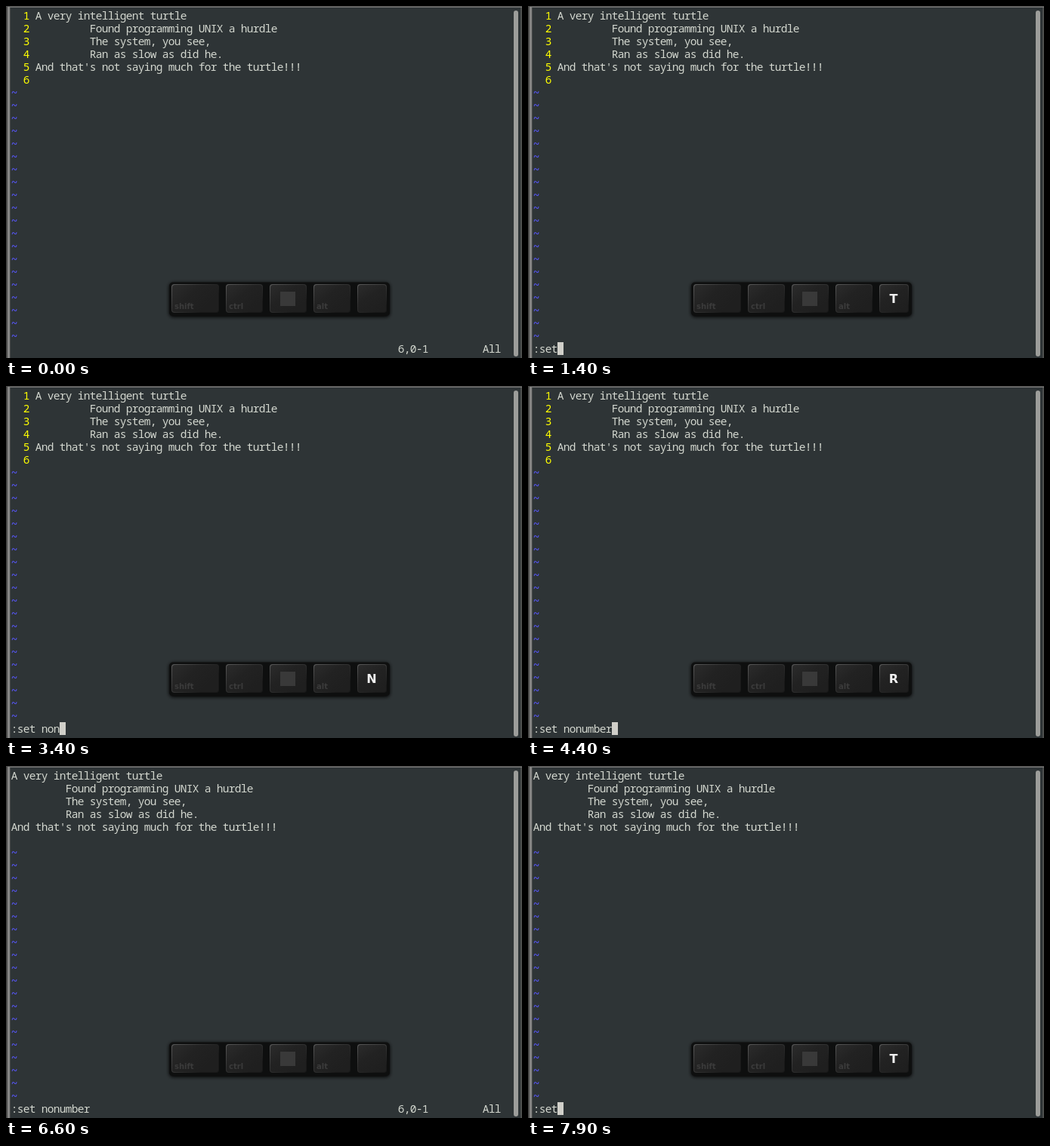
An HTML page with a canvas for the animation above (8000 ms loop, 683x467 px).

```html
<!DOCTYPE html>
<html lang="en">
<head>
<meta charset="utf-8">
<title>Terminal editor</title>
<style>
html, body { margin: 0; width: 100%; height: 100%; overflow: hidden; background: #2e3436; }
canvas { display: block; }
</style>
</head>
<body>
<canvas id="stage" width="683" height="467"></canvas>
<script>
const ctx = document.getElementById('stage').getContext('2d');
const LOOP = 8000, COL = 8, ROW = 17, LEFT = 7, TOP = 4, LAST = 26;
const MONO = '14.5px "Noto Sans Mono", "DejaVu Sans Mono", monospace';
const FG = '#d3d7cf', CURSOR = '#d0cfc9';
const INDENT = ' '.repeat(9);
const POEM = [
  'A very intelligent turtle',
  INDENT + 'Found programming UNIX a hurdle',
  INDENT + 'The system, you see,',
  INDENT + 'Ran as slow as did he.',
  "And that's not saying much for the turtle!!!",
  ''
];

// [start ms, command line (null = normal mode), key on display]
const STEPS = [
  [0, null, ''],
  [500, ':', ':'], [1000, ':', ''], [1100, ':s', 'S'], [1200, ':se', 'E'], [1400, ':set', 'T'],
  [1800, ':set ', 'Space'], [2100, ':set n', 'N'], [2200, ':set no', 'O'],
  [2800, ':set nom', 'M'], [3100, ':set no', 'Back'], [3400, ':set non', 'N'],
  [3600, ':set nonu', 'U'], [3800, ':set nonum', 'M'],
  [4000, ':set nonum', 'B'], [4100, ':set nonumb', 'B'],
  [4300, ':set nonumbe', 'E'], [4400, ':set nonumber', 'R'],
  [4800, null, 'Enter'], [5300, null, ''],
  [7000, null, ':'], [7100, ':', ':'], [7500, ':', ''],
  [7600, ':s', 'S'], [7700, ':se', 'E'], [7900, ':set', 'T']
];
const CURSOR_ON = [[300, 500], [4800, 5400], [6000, 6600], [6900, 7100]];
const SHIFT_ON = [[300, 1000], [6900, 7500]];

const within = (spans, t) => spans.some(([a, b]) => t >= a && t < b);

function rect(x, y, w, h, color) {
  ctx.fillStyle = color;
  ctx.fillRect(x, y, w, h);
}

function box(x, y, w, h, r, color) {
  ctx.fillStyle = color;
  ctx.beginPath();
  ctx.roundRect(x, y, w, h, r);
  ctx.fill();
}

// terminal text: each character is centred in its cell
function print(str, col, row, color = FG, weight = '') {
  ctx.font = `${weight} ${MONO}`;
  ctx.textAlign = 'center';
  ctx.fillStyle = color;
  [...str].forEach((c, i) => {
    ctx.fillText(c, LEFT + (col + i + 0.5) * COL, TOP + row * ROW + 14);
  });
}

function drawCursor(col, row) {
  rect(LEFT + col * COL, TOP + row * ROW, COL, ROW, CURSOR);
}

function drawWindow() {
  rect(0, 0, 683, 467, '#2e3436');
  rect(0, 0, 683, 1, '#4a4a49');
  rect(0, 1, 683, 1, '#7c7c7b');
  rect(0, 0, 2, 467, '#474746');
  rect(2, 1, 3, 466, '#858584');
  rect(5, 2, 1, 465, '#484b4b');
  box(672, 6, 6, 459, 3, '#9c9d9a');
  rect(681, 2, 2, 465, '#4c4e4d');
}

function drawKey(x, w) {
  const y = 369, h = 38;
  const slope = (from, mid, to) => {
    const g = ctx.createLinearGradient(x, y, x + w * 0.6, y + h);
    g.addColorStop(0, from);
    g.addColorStop(0.5, mid);
    g.addColorStop(1, to);
    return g;
  };
  box(x, y, w, h, 4, slope('#5a5a5a', '#353535', '#191919'));
  box(x + 1, y + 1, w - 2, h - 2, 3.5, slope('#2c2c2c', '#222222', '#1f1f1f'));
}

function keyText(str, x, y, size, color, align = 'left') {
  ctx.font = `bold ${size}px "DejaVu Sans", sans-serif`;
  ctx.textAlign = align;
  ctx.fillStyle = color;
  ctx.fillText(str, x, y);
}

function drawKeys(key, shift) {
  const wide = key.length > 1;
  const keyW = wide ? 64 : 39;
  const dim = '#3b3b3b', lit = '#f0f0f0';

  ctx.save();
  ctx.shadowColor = '#000';
  ctx.shadowBlur = 5;
  ctx.shadowOffsetY = 1;
  box(216, 366.5, 465 + keyW + 4 - 216, 45, 5, '#0e0f0f');
  ctx.restore();

  drawKey(219, 63);
  drawKey(291, 49);
  drawKey(349, 49);
  drawKey(407, 49);
  drawKey(465, keyW);
  keyText('shift', 223, 402, 10, shift ? lit : dim);
  keyText('ctrl', 295, 402, 10, dim);
  keyText('alt', 411, 402, 10, dim);
  rect(363, 379, 20, 19, '#393939');
  if (key) keyText(key, 465 + keyW / 2 - 0.5, 394, wide ? 13 : 16, lit, 'center');
}

function draw(t) {
  const [, cmd, key] = STEPS.findLast(s => t >= s[0]);
  const numbered = t < 4800;
  const indent = numbered ? 4 : 0;

  drawWindow();
  POEM.forEach((line, i) => {
    if (numbered) print(String(i + 1), 2, i, '#ffff00');
    print(line, indent, i);
  });
  for (let row = POEM.length; row < LAST; row++) print('~', 0, row, '#5454ec', 'bold');

  if (cmd !== null) {
    print(cmd, 0, LAST);
    drawCursor(cmd.length, LAST);
  } else {
    if (!numbered) print(':set nonumber', 0, LAST);
    print('6,0-1', 64, LAST);
    print('All', 78, LAST);
    if (within(CURSOR_ON, t)) drawCursor(indent, POEM.length - 1);
  }
  drawKeys(key, within(SHIFT_ON, t));
}

const start = performance.now();
function tick() {
  draw((performance.now() - start) % LOOP);
  requestAnimationFrame(tick);
}
tick();
</script>
</body>
</html>
```
